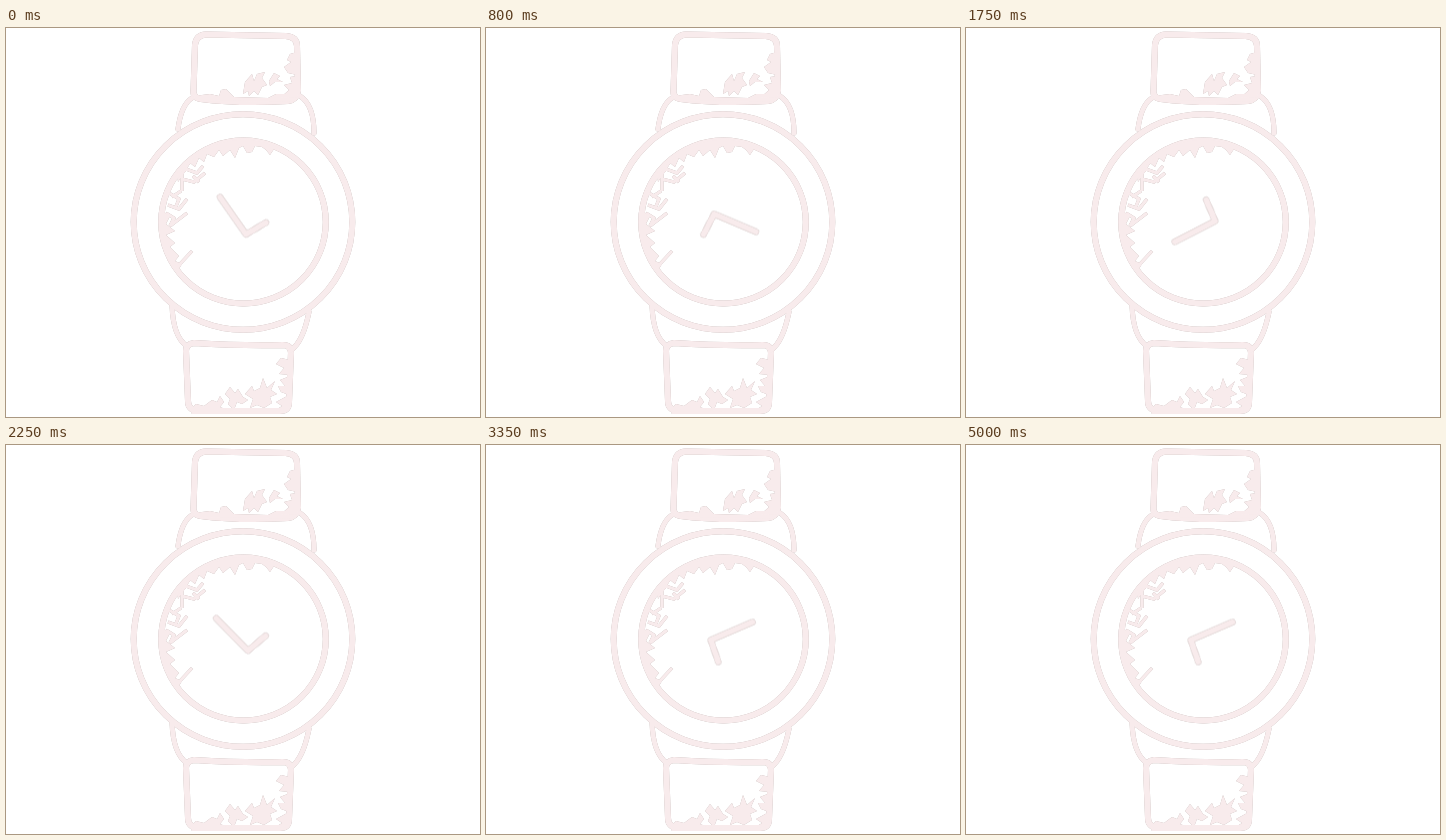
Animation of 474x389 px, one loop 5050 ms. Source, as an HTML page:

```html
<!DOCTYPE html>
<html lang="en">
<head>
<meta charset="utf-8">
<title>Wristwatch</title>
<style>
  html, body { margin: 0; width: 100%; height: 100%; overflow: hidden; background: #fff; }
  svg { display: block; width: 100vw; height: 100vh; }
  .watch { filter: drop-shadow(0 0 .4px #b5aaa8); }
  .line { fill: none; stroke: #f8ebec; stroke-width: 6; stroke-linecap: round; stroke-linejoin: round; }
  .lug { stroke-width: 5; }
  .twig { stroke-width: 3.2; stroke-linejoin: miter; stroke-linecap: butt; }
  .leaf { fill: #f8ebec; }

  /* Each stretch advances in 50 ms ticks, then the hands rest. */
  .hands { animation: spin 5050ms -4ms infinite; }
  @keyframes spin {
    0%       { transform: rotate(235deg);   animation-timing-function: steps(11, end); }
    10.8911% { transform: rotate(346deg);   animation-timing-function: steps(5, end); }
    15.8416% { transform: rotate(383deg);   animation-timing-function: steps(6, end); }
    21.7822% { transform: rotate(419deg);   animation-timing-function: steps(8, end); }
    29.7030% { transform: rotate(476.4deg); animation-timing-function: steps(15, end); }
    44.5545% { transform: rotate(585.5deg); animation-timing-function: steps(13, end); }
    57.4257% { transform: rotate(677deg);   animation-timing-function: steps(2, end); }
    59.4059%, 100% { transform: rotate(696.7deg); }
  }
</style>
</head>
<body>
<svg viewBox="0 0 474 389" preserveAspectRatio="none">
  <g class="watch">
    <!-- straps -->
    <path class="line" d="M189 17Q190 7 200 6.5L280 8Q291 9 291 18L292 63Q291 72 282 73Q235 76 195 71Q187 70 187.5 63Z"/>
    <path class="line" d="M180 323Q180 316 188 315Q235 318 277 317Q285 317 285 325L283 374Q283 383 274 383L192 383Q182 382 182 373Z"/>

    <!-- lugs -->
    <path class="line lug" d="M186 70Q175 77 172 101M294 68Q308 77 308 105M166 277Q167 309 181 318M303 284Q297 314 285 322"/>

    <!-- case and dial -->
    <ellipse class="line" cx="237" cy="194" rx="109.3" ry="107.8"/>
    <ellipse class="line" cx="237.5" cy="194" rx="82.3" ry="81.5"/>

    <!-- strap pattern -->
    <path class="leaf" d="M188 68L204 66L213 68L215 62L220 61L224 65L228 69L262 70L270 66L290 66L288 74L190 72Z"/>
    <path class="leaf" d="M237 66L239 54L246 46L248 53L251 46L259 44L256 50L261 57L256 59L252 67L248 63L243 68L242 63Z"/>
    <path class="leaf" d="M263 53L268 45L274 48L271 51L277 54L269 54L264 58ZM291 24L284 26L281 32L285 34L278 39L282 45L291 47ZM291 48L284 49L286 55L278 57L283 62L275 69L291 70Z"/>
    <path class="leaf" d="M184 382L190 376L198 378L206 372L211 374L214 368L218 374L214 379L222 382L240 384L240 386L186 386Z"/>
    <path class="leaf" d="M219 366L224 359L229 365L232 361L237 369L242 372L236 376L231 374L228 382L222 376L224 371Z"/>
    <path class="leaf" d="M239 366L246 358L248 363L254 360L257 350L261 360L269 353L265 362L271 366L264 369L266 375L258 380L251 377L244 380L247 371Z"/>
    <path class="leaf" d="M284 332L275 330L270 336L278 340L273 346L284 347ZM284 348L274 352L279 358L272 358L275 364L283 367L270 374L276 378L268 383L283 382Z"/>

    <!-- dial pattern -->
    <path class="leaf" d="M278 122Q238 101 197 122L171 144L172 154L181 141L184 135L189 139L193 130L198 134L201 126L208 129L213 122L217 128L224 122L229 130L233 120L237 118L241 125L246 124L249 118L256 119L260 122L264 127L268 121Z"/>
    <path class="leaf" d="M159 166L154 188L155 207L164 232L171 244L176 236L169 233L173 228L164 219L169 215L160 207L169 203L160 196L164 188L158 184Z"/>
    <path class="line twig" d="M169 151L180 141L191 145L197 138M176 144V163M176 151L188 154L199 145M187 148L193 154M163 165L173 171L169 181M162 177L173 181L181 171M160 185L168 190L164 198L181 185M166 169L175 163M173 237L186 223"/>
  </g>

  <g transform="translate(237 194.5)">
    <g class="watch">
      <g class="hands">
        <path class="line" d="M34-4.2L-11.5-4.2L-13.2 18.8"/>
      </g>
    </g>
  </g>
</svg>
</body>
</html>
```
